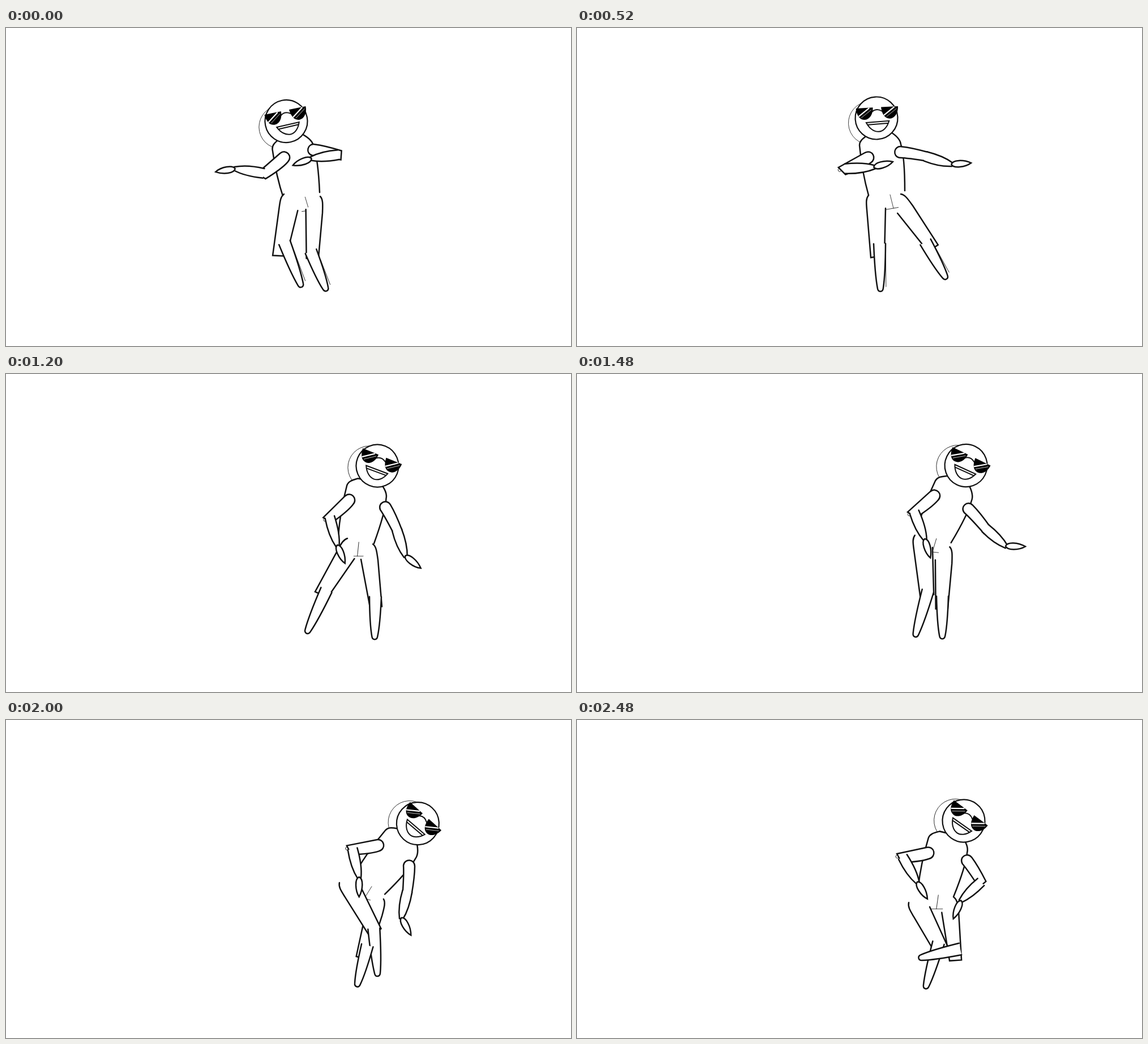
These frames come from a looping animation (998x561 px, 2.52 s). An HTML page with a canvas:

```html
<!DOCTYPE html>
<html lang="en">
<head>
<meta charset="utf-8">
<title>Dancer</title>
<style>
html, body { margin: 0; width: 100%; height: 100%; overflow: hidden; background: #fff; }
canvas { display: block; }
</style>
</head>
<body>
<canvas id="stage" width="998" height="561"></canvas>
<script>
const ctx = document.getElementById('stage').getContext('2d');
const LOOP = 2520, STEP = 40, INK = '#111';
const times = [0, 520, 880, 1200, 1800, 2200, 2480];
const rad = Math.PI / 180;

function turn(x, y, a) {
  const c = Math.cos(a * rad), s = Math.sin(a * rad);
  return [x * c - y * s, x * s + y * c];
}

function attach(base, p) {
  const [x, y] = turn(p.x, p.y, base.a);
  return { x: base.x + x, y: base.y + y, a: base.a + p.a };
}

// Smooth curve through the key values.
function sample(v, t) {
  const last = times.length - 1;
  if (t >= times[last]) return v[last];
  let i = 0;
  while (t >= times[i + 1]) i++;
  const slope = k => {
    const p = Math.max(k - 1, 0), n = Math.min(k + 1, last);
    return (v[n] - v[p]) / (times[n] - times[p]);
  };
  const d = times[i + 1] - times[i], u = (t - times[i]) / d, u2 = u * u, u3 = u2 * u;
  return (2 * u3 - 3 * u2 + 1) * v[i] + (u3 - 2 * u2 + u) * d * slope(i)
    + (3 * u2 - 2 * u3) * v[i + 1] + (u3 - u2) * d * slope(i + 1);
}

const bump = (t, from, to) => t > from && t < to ? Math.sin(Math.PI * (t - from) / (to - from)) : 0;

// x and y are stage positions per key, or one joint in the parent's frame.
function part(parent, a, x, y, lift) {
  const fixed = typeof x === 'number';
  const rel = { x: [], y: [], a: [] };
  const world = times.map((_, k) => {
    let p;
    if (!parent) p = { x: x[k], y: y[k], a: a[k] };
    else {
      const b = parent.world[k];
      const [px, py] = fixed ? [x, y] : turn(x[k] - b.x, y[k] - b.y, -b.a);
      p = { x: px, y: py, a: a[k] - b.a };
    }
    for (const n in rel) rel[n].push(p[n]);
    return parent ? attach(parent.world[k], p) : p;
  });
  const at = t => {
    const p = { x: sample(rel.x, t), y: sample(rel.y, t), a: sample(rel.a, t) };
    if (lift) p.a += lift(t);
    return parent ? attach(parent.at(t), p) : p;
  };
  return { world, at };
}

const torso = part(null, [-2.6, 0, 11.5, 20, 42, 44, 22],
  [554, 579, 616, 650, 667, 669, 665], [290, 287, 300, 299, 299, 316, 312]);
const pelvis = part(torso, [-8, -10, -16, 0, 10, 18, 0], -20, 31);
const head = part(torso, [-11.6, -3, 24, 22, 33, 48.8, 36.5],
  [495, 529, 605, 656, 715, 728, 683], [164.5, 159, 167, 162, 168, 194, 178]);

const thighL = part(null, [12.5, 0, -2, 33.3, -44.7, -3.6, -25.8],
  [491, 515, 549, 603, 582, 597, 586], [293, 295, 305, 290, 283, 296, 322]);
const shinL = part(thighL, [69, 89, 125.5, 114.7, 95.2, 80.7, 106],
  [492, 534.5, 581.5, 566, 665.5, 618.5, 638.5], [378.5, 380.5, 392, 381, 341.5, 392.5, 393]);
const thighR = part(null, [10, -28, -17, 0, 19, 22, 1.5],
  [555, 572, 612, 648, 664, 668, 666], [297, 293, 302, 300, 312, 318, 313]);
const shinR = part(thighR, [68.3, 60.5, 86.5, 91, 93, 123.5, 167.6],
  [538.5, 615.5, 644.5, 652.5, 639, 643, 677], [394, 377.5, 387.5, 393, 391, 406.5, 404]);

const armL = part(torso, [139.5, 151.5, 144, 136, 148.5, 188, 168.5],
  [491, 514, 562, 606, 652, 652, 620], [229, 229, 231, 223, 213, 231, 235]);
const foreL = part(armL, [189, -3, 62, 75, 63, 89, 60], 45, 2.5);
const handL = part(foreL, [171, -16, 45, 67, 79, 95, 59], 51, 0);
const armR = part(torso, [11, 9.5, 61, 63, 98, 82, 57],
  [543, 571, 619, 670, 706, 712, 689], [215, 219, 242, 235, 246, 265, 248],
  t => -32 * bump(t, 1200, 1800));
const foreR = part(armR, [172, 17, 90, 72, 84, 124, 137], 45, 0);
const handR = part(foreR, [160, -4, 59, 38.5, 38, 90, 113], 48, 0);

const shape = d => new Path2D(d);
const shin = n => shape(`M0,-10.5 C${n * .5},-9.5 ${n * .8},-7 ${n - 5},-5 C${n + 2},-4 ${n + 2},4 ${n - 5},5 C${n * .8},7 ${n * .5},9.5 0,10.5`);
const fore = n => shape(`M0,8.5 C20,10 ${n - 14},8 ${n},3 L${n},-3 C${n - 14},-8 20,-9.5 0,-8.5`);
const art = {
  torso: shape('M-64,8 C-72,-20 -77,-48 -80,-80 C-80,-88 -74,-92 -66,-98 L-26,-104 C-16,-98 -8,-90 -7,-82 C-1,-62 0,-30 0,0'),
  thighL: shape('M0,0 C-5,6 -4,14 -3,26 L4,110 L28,106 L30,23'),
  thighR: shape('M0,0 C6,4 7,14 9,28 L16,110 L-5,112 L-21,27'),
  shinL: shin(84),
  shinR: shin(75),
  armL: shape('M54,10 L0,10.5 C-14,10 -14,-9 0,-10 C14,-12 30,-10 49,-7 Z'),
  armR: shape('M49,-8 C30,-10 15,-11 0,-10 C-13,-9 -13,9 0,10 C15,8 35,8 51,8 Z'),
  foreL: fore(53),
  foreR: fore(50),
  hand: shape('M0,0 C3,-8 22,-7 35,0 C24,7 3,8 0,0 Z'),
  lens: shape('M-15,-10 L15,-10 C15,2 8,11 0,11 C-9,11 -14,3 -15,-10 Z'),
  mouth: shape('M-18.5,7 L22,6 C18,18 10,24 3,24 C-6,24 -14,17 -18.5,7 Z M-15,11 L19,10'),
  bridge: shape('M-7,-12 Q1,-18 10,-12')
};

function place(p, draw) {
  ctx.save();
  ctx.translate(p.x, p.y);
  ctx.rotate(p.a * rad);
  draw();
  ctx.restore();
}

function ink(path, width = 2.5, fill = '#fff') {
  if (fill) {
    ctx.fillStyle = fill;
    ctx.fill(path);
  }
  ctx.strokeStyle = INK;
  ctx.lineWidth = width;
  ctx.stroke(path);
}

function line(x1, y1, x2, y2, width = .8, color = INK) {
  ctx.strokeStyle = color;
  ctx.lineWidth = width;
  ctx.beginPath();
  ctx.moveTo(x1, y1);
  ctx.lineTo(x2, y2);
  ctx.stroke();
}

function circle(x, y, r, width, fill) {
  const c = new Path2D();
  c.arc(x, y, r, 0, 2 * Math.PI);
  ink(c, width, fill);
}

function drawShin(path, length, t) {
  ink(path);
  if (t < 700) line(20, -10.5, length - 8, -10, .8);
}

function drawFace() {
  circle(0, 0, 37.5, 2.2, '#fff');
  ink(art.mouth, 2);
  ink(art.bridge, 2, null);
  for (const x of [-20.5, 24]) {
    ctx.save();
    ctx.translate(x, -9);
    ctx.fillStyle = '#000';
    ctx.fill(art.lens);
    line(-10, 4, 8, -9, 2.2, '#fff');
    line(-6, 7, 12, -6, .7, '#fff');
    ctx.restore();
  }
}

function draw(t) {
  const put = (p, f) => place(p.at(t), f);
  ctx.fillStyle = '#fff';
  ctx.fillRect(0, 0, 998, 561);
  ctx.save();
  ctx.translate(0, -18 * bump(t, 0, 520));
  put(head, () => circle(-12, 8, 38, .8, '#fff'));
  put(torso, () => {
    ink(art.torso);
    line(-26, 7, -20, 31);
  });
  put(pelvis, () => line(-13, 0, 11, 0));
  put(thighR, () => ink(art.thighR));
  put(thighL, () => ink(art.thighL));
  put(shinL, () => drawShin(art.shinL, 84, t));
  put(shinR, () => drawShin(art.shinR, 75, t));
  put(armL, () => {
    circle(54, 5, 3, .8, null);
    ink(art.armL);
  });
  put(foreL, () => ink(art.foreL));
  put(handL, () => ink(art.hand));
  put(armR, () => ink(art.armR));
  put(foreR, () => ink(art.foreR));
  put(handR, () => ink(art.hand));
  put(head, drawFace);
  ctx.restore();
}

ctx.lineCap = 'round';
let start;
function tick(now) {
  start ??= now;
  draw(Math.floor(((now - start) % LOOP) / STEP) * STEP);
  requestAnimationFrame(tick);
}
draw(0);
requestAnimationFrame(tick);
</script>
</body>
</html>
```
